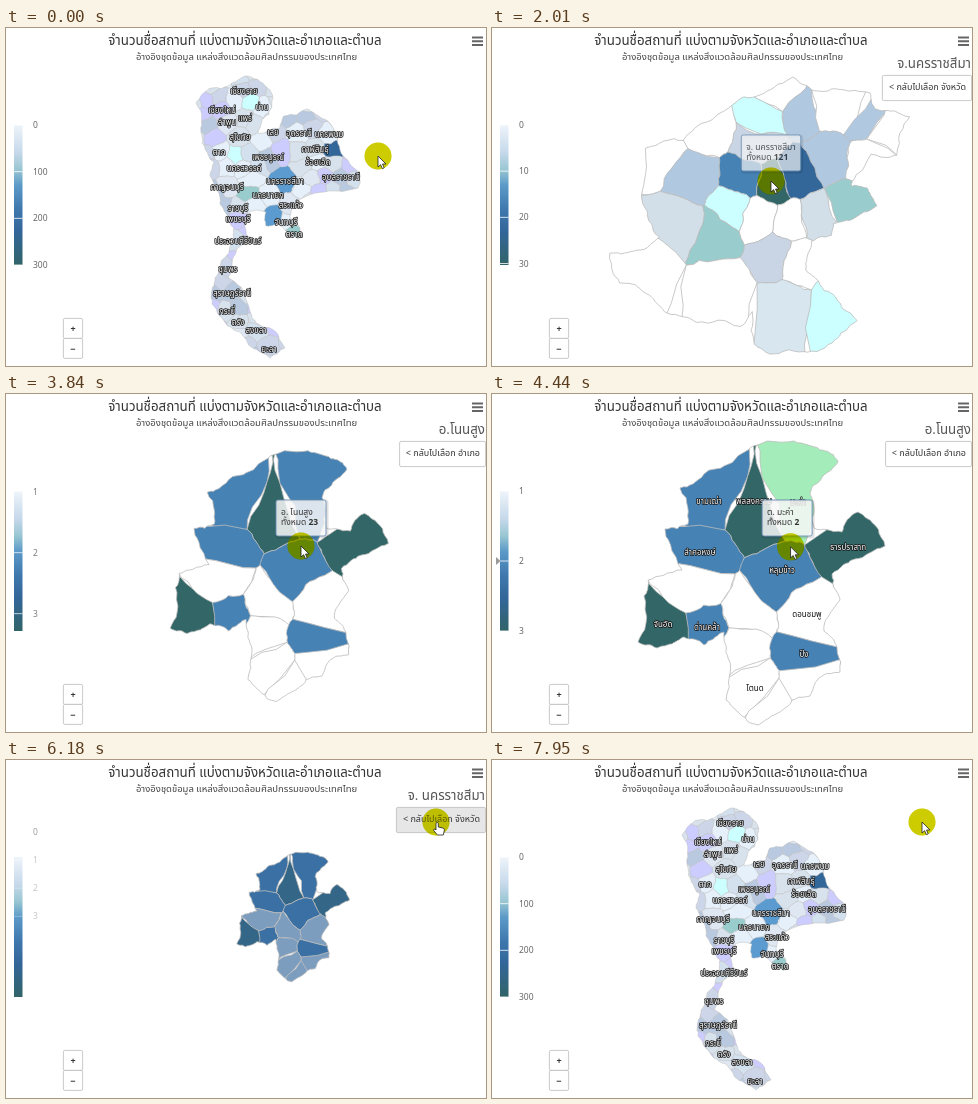
These frames come from a looping animation (480x338 px, 7.98 s). An HTML page:

```html
<!DOCTYPE html>
<html lang="th">
<head>
<meta charset="utf-8">
<style>
html, body { margin: 0; width: 100%; height: 100%; overflow: hidden; background: #fff; }
svg { display: block; width: 480px; height: 338px; font-family: "Noto Sans Thai", "Noto Sans", sans-serif; }
.map path { stroke: #bcbcbc; stroke-width: .8; stroke-linejoin: round; vector-effect: non-scaling-stroke; }
#map0 path { stroke-width: .5; }
.names { font-size: 8px; text-anchor: middle; font-weight: 500; }
.names text { fill: #fff; stroke: #111; stroke-width: 1.4px; stroke-linejoin: round; paint-order: stroke; }
.names .plain { fill: #111; stroke: none; }
.axis { font-size: 8.5px; fill: #666; }
.axis line { stroke: #fff; stroke-width: .8; }
.btn { fill: #fff; stroke: #bbb; stroke-width: .8; }
</style>
</head>
<body>
<svg viewBox="0 0 480 338">
  <defs>
    <linearGradient id="ramp" x1="0" y1="0" x2="0" y2="1">
      <stop offset="0" stop-color="#eef4fa"/>
      <stop offset=".2" stop-color="#c5d8ea"/>
      <stop offset=".32" stop-color="#98c6d2"/>
      <stop offset=".43" stop-color="#5c9ac8"/>
      <stop offset=".6" stop-color="#3f78ae"/>
      <stop offset=".76" stop-color="#336699"/>
      <stop offset="1" stop-color="#316468"/>
    </linearGradient>
    <clipPath id="axisBox"><rect y="45" width="56" height="240"/></clipPath>
  </defs>
  <rect width="480" height="338" fill="#fff"/>
  <text x="239" y="17" font-size="13.300" font-weight="300" fill="#333" text-anchor="middle">จำนวนชื่อสถานที่ แบ่งตามจังหวัดและอำเภอและตำบล</text>
  <text x="240.500" y="32" font-size="9.500" font-weight="300" fill="#444" text-anchor="middle">อ้างอิงชุดข้อมูล แหล่งสิ่งแวดล้อมศิลปกรรมของประเทศไทย</text>
  <path d="M466 9.500h11M466 13.200h11M466 17h11" stroke="#666" stroke-width="2"/>

  <g id="map0" class="map"></g>
  <g id="map1" class="map"></g>
  <g id="map2" class="map"></g>
  <g id="names0" class="names"></g>
  <g id="names1" class="names"></g>
  <g id="names2" class="names"></g>

  <rect x="8" y="97" width="8.500" height="140" fill="url(#ramp)"/>
  <g id="axis" class="axis" clip-path="url(#axisBox)"></g>
  <path id="marker" d="M4-4L8.500 0L4 4Z" fill="#999"/>

  <g font-size="9" font-weight="700" fill="#333" text-anchor="middle">
    <rect class="btn" x="57.400" y="290.400" width="19.200" height="20" rx="1.500"/>
    <rect class="btn" x="57.400" y="310.400" width="19.200" height="20" rx="1.500"/>
    <text x="67" y="304">+</text>
    <text x="67" y="324">−</text>
  </g>

  <g id="drill" text-anchor="end">
    <text id="place" x="479" y="40" font-size="13.300" font-weight="300" fill="#555"></text>
    <rect id="back" class="btn" y="47.400" height="25.200" rx="1.500"/>
    <text id="backText" x="474" y="62" font-size="9" fill="#333"></text>
  </g>

  <g id="tip">
    <rect id="tipShade" x="1" y="1" height="36" rx="2" fill="none" stroke="#000" stroke-opacity=".12" stroke-width="3"/>
    <rect id="tipBox" height="36" rx="2" fill="#f7f7f7" fill-opacity=".85" stroke="#6b8fb5" stroke-width=".9"/>
    <g font-size="8.500" fill="#333">
      <text id="tipName" x="5" y="14.500"></text>
      <text x="5" y="25">ทั้งหมด <tspan id="tipValue" font-weight="700"></tspan></text>
    </g>
  </g>

  <g id="glow" style="mix-blend-mode:multiply"><circle r="13.500" fill="#cccc00"/></g>
  <g id="pointer">
    <circle r="13.500" fill="#cccc00" opacity=".3"/>
    <path id="arrow" d="M0 0V11L2.600 8.700L4.400 12.600L6.200 11.800L4.500 8H8Z" fill="#fff" stroke="#222" stroke-width=".8"/>
    <path id="hand" d="M0 1.200Q1.200-.4 2.300 1.200V5L7.500 6.200Q8.600 6.800 8.300 8.500L7.300 13H1.400L-2.400 8.300Q-2.400 6.600-.8 7.200L0 8Z" fill="#fff" stroke="#222" stroke-width=".8"/>
  </g>
</svg>
<script>
const LOOP = 7980, ZOOM = 500;
const $ = id => document.getElementById(id);
const clamp = x => Math.max(0, Math.min(1, x));
const lin = (t, a, b) => clamp((t - a) / (b - a));
const lerp = (a, b, p) => a + (b - a) * p;
const out = p => Math.sin(clamp(p) * Math.PI / 2);
const inOut = p => .5 - Math.cos(clamp(p) * Math.PI) / 2;
const show = (el, on) => el.setAttribute('visibility', on ? 'visible' : 'hidden');
const rand = (a, b) => { const v = Math.sin(a * 12.9898 + b * 78.233) * 43758.5453; return v - Math.floor(v); };
const rgb = c => [1, 3, 5].map(i => parseInt(c.slice(i, i + 2), 16));
const mix = (a, b, p) => a.map((v, i) => lerp(v, b[i], p));

function add(parent, tag, attrs, text) {
  const el = document.createElementNS('http://www.w3.org/2000/svg', tag);
  for (const k in attrs) el.setAttribute(k, attrs[k]);
  if (text != null) el.textContent = text;
  return parent.appendChild(el);
}

// Neighbours bend a shared edge alike: the offset depends on its midpoint only.
function bend(a, b, depth) {
  if (!depth) return [a];
  const len = Math.hypot(b[0] - a[0], b[1] - a[1]) * .22;
  const x = (a[0] + b[0]) / 2, y = (a[1] + b[1]) / 2;
  const m = [x + (rand(x, y) - .5) * len, y + (rand(y, x) - .5) * len];
  return [...bend(a, m, depth - 1), ...bend(m, b, depth - 1)];
}
function rough(pts) {
  const all = pts.flatMap((a, i) => bend(a, pts[(i + 1) % pts.length], 3));
  return 'M' + all.map(p => p.map(v => v.toFixed(1)).join(' ')).join('L') + 'Z';
}

// Voronoi cell: cut a big square by the bisector to every other seed.
function cell(s, seeds) {
  let poly = [[-150, -150], [150, -150], [150, 150], [-150, 150]].map(p => [s.x + p[0], s.y + p[1]]);
  for (const o of seeds) {
    if (o === s) continue;
    const dx = o.x - s.x, dy = o.y - s.y;
    const side = p => (p[0] - (s.x + o.x) / 2) * dx + (p[1] - (s.y + o.y) / 2) * dy;
    poly = poly.flatMap((a, i) => {
      const b = poly[(i + 1) % poly.length], u = side(a), v = side(b);
      const cut = u * v < 0 ? [mix(a, b, u / (u - v))] : [];
      return u <= 0 ? [a, ...cut] : cut;
    });
  }
  return poly;
}

const W = '#ffffff', PALE = '#d2dfe8', HAZE = '#c9d5e4', SOFT = '#b0c8e0', TEAL = '#99cccc', CYAN = '#ccffff';
const SKY = '#5b9bd0', BLUE = '#4682b4', NAVY = '#336699', DEEP = '#336666';
const TINTS = ['#dfe7f3', '#ccccff', '#d3e0ee', '#b8c9e0', '#e6f0fa', '#ccd6e8', '#d8e2ec'];

const outlines = [
  '190,75 206,60 222,58 240,48 264,62 266,78 256,92 252,106 274,100 278,88 302,81 326,98 334,122 354,146 352,160 ' +
  '318,164 286,180 284,190 294,200 292,211 272,196 260,198 260,184 243,184 240,210 226,238 222,250 236,260 246,290 ' +
  '270,304 279,320 264,330 234,304 222,298 206,276 206,262 212,246 226,214 228,200 214,176 204,148 208,134 196,108',
  '301,48 326,62 353,61 379,64 384,80 419,88 406,127 380,126 360,158 376,160 386,178 358,193 342,196 340,208 320,214 ' +
  '314,242 326,253 344,270 366,294 346,312 316,326 278,328 262,318 260,285 248,300 204,296 178,288 158,270 126,256 ' +
  '116,226 140,224 166,210 156,194 148,168 152,120 190,112 204,98 240,76 268,66',
  '256,56 302,47 333,57 346,68 330,83 318,100 322,134 350,138 366,118 378,126 393,152 360,166 340,180 348,206 332,237 ' +
  '342,246 348,278 326,285 318,302 300,306 284,320 266,331 248,320 234,306 236,264 232,238 212,251 192,243 180,250 ' +
  '165,254 146,248 152,202 156,186 190,176 173,135 196,130 188,94 212,80'
];

// name, x, y, colour, label shift
const seedLists = [
  [['เชียงราย', 238, 63], ['เชียงใหม่', 216, 82], ['น่าน', 256, 79], ['ลำพูน', 221, 94], ['แพร่', 239, 90],
    ['สุโขทัย', 234, 109], ['เลย', 267, 104], ['อุดรธานี', 293, 105], ['นครพนม', 323, 106], ['ตาก', 213, 124],
    ['เพชรบูรณ์', 262, 129], ['กาฬสินธุ์', 309, 121], ['ร้อยเอ็ด', 312, 134], ['นครสวรรค์', 238, 140],
    ['นครราชสีมา', 279, 153, SKY], ['อุบลราชธานี', 335, 149], ['กาญจนบุรี', 221, 159], ['นครนายก', 262, 167],
    ['ราชบุรี', 232, 180], ['สระแก้ว', 285, 177], ['เพชรบุรี', 232, 191], ['จันทบุรี', 280, 194],
    ['ตราด', 288, 206, TEAL], ['ประจวบคีรีขันธ์', 232, 213], ['ชุมพร', 222, 241], ['สุราษฎร์ธานี', 226, 265],
    ['กระบี่', 221, 283], ['ตรัง', 232, 294], ['สงขลา', 250, 302], ['ยะลา', 263, 321],
    ['', 327, 122, NAVY], ['', 244, 73, CYAN], ['', 230, 128, CYAN], ['', 242, 164, TEAL], ['', 267, 190, SKY]],
  [['บัวใหญ่', 286, 64, W], ['', 272, 88, CYAN], ['', 310, 80, SOFT], ['ประทาย', 346, 80, W], ['', 370, 86, SOFT],
    ['ชุมพวง', 400, 104, W], ['คง', 266, 112, HAZE], ['พิมาย', 338, 130, SOFT], ['', 376, 136, W],
    ['เทพารักษ์', 215, 98, W], ['', 166, 128, W], ['ด่านขุนทด', 200, 150, SOFT], ['โนนไทย', 252, 152, BLUE],
    ['', 281, 156, DEEP], ['โนนสูง', 304, 148, NAVY], ['สีคิ้ว', 185, 194, PALE], ['', 241, 180, CYAN],
    ['สูงเนิน', 222, 205, TEAL], ['', 266, 188, W], ['', 300, 194, W], ['โชคชัย', 284, 226, HAZE],
    ['จักราช', 324, 190, PALE], ['ห้วยแถลง', 360, 176, TEAL], ['', 308, 232, W], ['ปากช่อง', 150, 245, W],
    ['ปักธงชัย', 230, 262, W], ['ครบุรี', 291, 280, '#d8e6f0'], ['เสิงสาง', 342, 288, CYAN]],
  [['ขามเฒ่า', 217, 107, BLUE], ['พลสงคราม', 262, 120, DEEP, -13], ['มะค่า', 306, 108, BLUE], ['ลำคอหงษ์', 208, 158, BLUE],
    ['หลุมข้าว', 290, 188, BLUE, -12], ['ธารปราสาท', 356, 153, DEEP], ['จันอัด', 171, 230, DEEP], ['ด่านคล้า', 215, 233, BLUE],
    ['ดอนชมพู', 315, 220, W], ['ปิง', 312, 260, BLUE], ['โตนด', 263, 294, W], ['', 205, 196, W], ['', 254, 220, W],
    ['', 246, 254, W], ['', 288, 310, W], ['', 310, 296, W]]
];

// Unnamed provinces fill the gaps of the country on a jittered grid.
for (let y = 46, row = 0; y < 340; y += 13, row++)
  for (let x = 186 + row % 2 * 7; x < 365; x += 15) {
    const px = x + (rand(x, y) - .5) * 8, py = y + (rand(y, x) - .5) * 8;
    const free = seedLists[0].every(s => Math.hypot(s[1] - px, s[2] - py) > (s[3] === SKY ? 19 : 11));
    if (free) seedLists[0].push(['', px, py]);
  }

const maps = seedLists.map((list, level) => {
  const g = $('map' + level);
  const edge = rough(outlines[level].split(' ').map(p => p.split(',').map(Number)));
  add(add(g, 'clipPath', { id: 'edge' + level }), 'path', { d: edge });
  const inner = add(g, 'g', { 'clip-path': `url(#edge${level})` });
  const items = list.map(([name, x, y, color, shift = 0]) => {
    color = color || TINTS[Math.floor(rand(x, y) * TINTS.length)];
    if (name) add($('names' + level), 'text', { x, y: y + 3 + shift, class: color === W ? 'plain' : '' }, name);
    return { name, x, y, own: rgb(color) };
  });
  for (const item of items) item.el = add(inner, 'path', { d: rough(cell(item, items)) });
  add(g, 'path', { d: edge, fill: 'none' });
  return items;
});

// Colour axis
const ranges = [[0, 300], [0, 30], [1, 3]];
const steps = [[0, 0, 0], [1560, 0, 1], [3510, 1, 2], [5960, 2, 1], [7380, 1, 0]];
const ticks = [[0, 100, 200, 300], [0, 10, 20, 30], [1, 2, 3]].flatMap((vs, scale) => vs.map(v => {
  const g = add($('axis'), 'g', {});
  add(g, 'line', { x1: 8, x2: 16.5 });
  add(g, 'text', { x: 27, y: 3 }, v);
  return { g, v, scale };
}));

// Hovered areas in order
const tips = [
  { from: 300, end: 480, level: 0, name: 'ยโสธร', value: 18 },
  { from: 480, end: 700, level: 0, name: 'ร้อยเอ็ด', value: 42 },
  { from: 700, end: 1560, level: 0, name: 'นครราชสีมา', value: 121 },
  { from: 2600, end: 3510, level: 1, name: 'โนนสูง', value: 23 },
  { from: 4350, end: 4620, level: 2, name: 'มะค่า', value: 2 },
  { from: 4620, end: 4900, level: 2, name: 'หลุมข้าว', value: 2 },
  { from: 4900, end: 5300, level: 2, name: 'ธารปราสาท', value: 3 }
];
const prefix = ['จ. ', 'อ. ', 'ต. '];
const hoverColor = ['#cfe6e6', '#a4edba', '#a4edba'].map(rgb);

// Where each child map grows out of its parent
const zoom = [null,
  { mid: [268, 189], spot: [281, 154], s: .11, tint: rgb(SKY), down: 1560, up: 7380 },
  { mid: [269, 189], spot: [297, 139], s: .15, tint: rgb(NAVY), down: 3510, up: 5960 }];

const track = [[30, 372, 128], [810, 279, 153], [2370, 279, 153], [2970, 295, 152],
  [4320, 295, 152], [5000, 342, 163], [5130, 342, 163], [5910, 430, 62]];
function cursorAt(t) {
  const i = track.findIndex(k => t < k[0]);
  const b = track[i < 0 ? track.length - 1 : i], a = track[i - 1] || b;
  const p = a === b ? 1 : inOut((t - a[0]) / (b[0] - a[0]));
  return [lerp(a[1], b[1], p), lerp(a[2], b[2], p)];
}

function drawMaps(t) {
  const down = t < 5000;
  const alpha = [
    t < 1560 ? 1 - .5 * lin(t, 1320, 1380) : lin(t, 7730, 7940),
    t < 1560 || t >= 7880 ? 0 : t < 3510 ? 1 - .5 * lin(t, 3270, 3360) : lin(t, 6440, 6640),
    +(t >= 3510 && t < 6460)
  ];
  const labels = [1,
    down ? lin(t, 2060, 2340) : +(t < 7380),
    t < 5940 ? lin(t, 4010, 4290) : 0];

  maps.forEach((items, level) => {
    const g = $('map' + level), z = zoom[level];
    g.setAttribute('opacity', alpha[level]);
    $('names' + level).setAttribute('opacity', alpha[level] * labels[level]);
    let q = 1;
    if (z) {
      const p = down ? out((t - z.down) / ZOOM) : 1 - out((t - z.up) / ZOOM);
      const [x, y] = mix(z.spot, z.mid, p);
      g.setAttribute('transform', `translate(${x} ${y}) scale(${lerp(z.s, 1, p)}) translate(${-z.mid[0]} ${-z.mid[1]})`);
      q = down ? clamp(p * 1.2) : p;
    }
    for (const item of items) {
      let c = z ? mix(z.tint, item.own, q) : item.own;
      const tip = tips.find(k => k.level === level && k.name === item.name);
      if (tip && t >= tip.from) c = mix(c, hoverColor[level], 1 - lin(t, tip.end, tip.end + 400));
      item.el.setAttribute('fill', `rgb(${c.map(Math.round)})`);
    }
  });
}

function drawAxis(t) {
  const [start, a, b] = steps.filter(s => t >= s[0]).pop();
  const p = a === b ? 1 : out((t - start) / ZOOM);
  const at = (v, [lo, hi]) => 97 + 140 * (v - lo) / (hi - lo);
  const y = v => lerp(at(v, ranges[a]), at(v, ranges[b]), p);
  for (const k of ticks) {
    k.g.setAttribute('transform', `translate(0 ${y(k.v)})`);
    k.g.setAttribute('opacity', k.scale === b ? p : k.scale === a ? 1 - p : 0);
  }
  const tip = tips.find(k => t >= k.from && t < k.end);
  show($('marker'), tip);
  if (tip) $('marker').setAttribute('transform', `translate(0 ${y(tip.value)})`);
}

// The tooltip trails the cursor and lingers after the hover ends.
function drawTip(t) {
  const tip = tips.filter(k => t >= k.from).pop();
  const alpha = tip ? 1 - lin(t, tip.end + 400, tip.end + 650) : 0;
  show($('tip'), alpha);
  if (!alpha) return;
  $('tipName').textContent = prefix[tip.level] + tip.name;
  $('tipValue').textContent = tip.value;
  const width = Math.max(50, $('tipName').getComputedTextLength() + 10);
  const [x, y] = cursorAt(Math.min(t, tip.end) - 100);
  $('tip').setAttribute('transform', `translate(${x - width / 2} ${y - 46})`);
  $('tip').setAttribute('opacity', alpha);
  $('tipShade').setAttribute('width', width);
  $('tipBox').setAttribute('width', width);
}

function drawDrill(t) {
  const deep = t >= 3270 && t < 5940;
  const x = deep ? 393.6 : 390.4;
  show($('drill'), t >= 1320 && t < 7380);
  $('place').textContent = deep ? 'อ.โนนสูง' : t < 5000 ? 'จ.นครราชสีมา' : 'จ. นครราชสีมา';
  $('backText').textContent = '< กลับไปเลือก ' + (deep ? 'อำเภอ' : 'จังหวัด');
  $('back').setAttribute('x', x);
  $('back').setAttribute('width', 479.6 - x);
  $('back').style.fill = t > 5760 ? '#e6e6e6' : '#fff';
}

function drawCursor(t) {
  const move = `translate(${cursorAt(t)})`;
  $('glow').setAttribute('transform', move);
  $('pointer').setAttribute('transform', move);
  const hand = [[300, 1560], [2600, 3510], [5760, 7380]].some(([s, e]) => t >= s && t < e);
  show($('hand'), hand);
  show($('arrow'), !hand);
}

function frame() {
  const t = performance.now() % LOOP;
  drawMaps(t);
  drawAxis(t);
  drawTip(t);
  drawDrill(t);
  drawCursor(t);
  requestAnimationFrame(frame);
}
frame();
</script>
</body>
</html>
```
